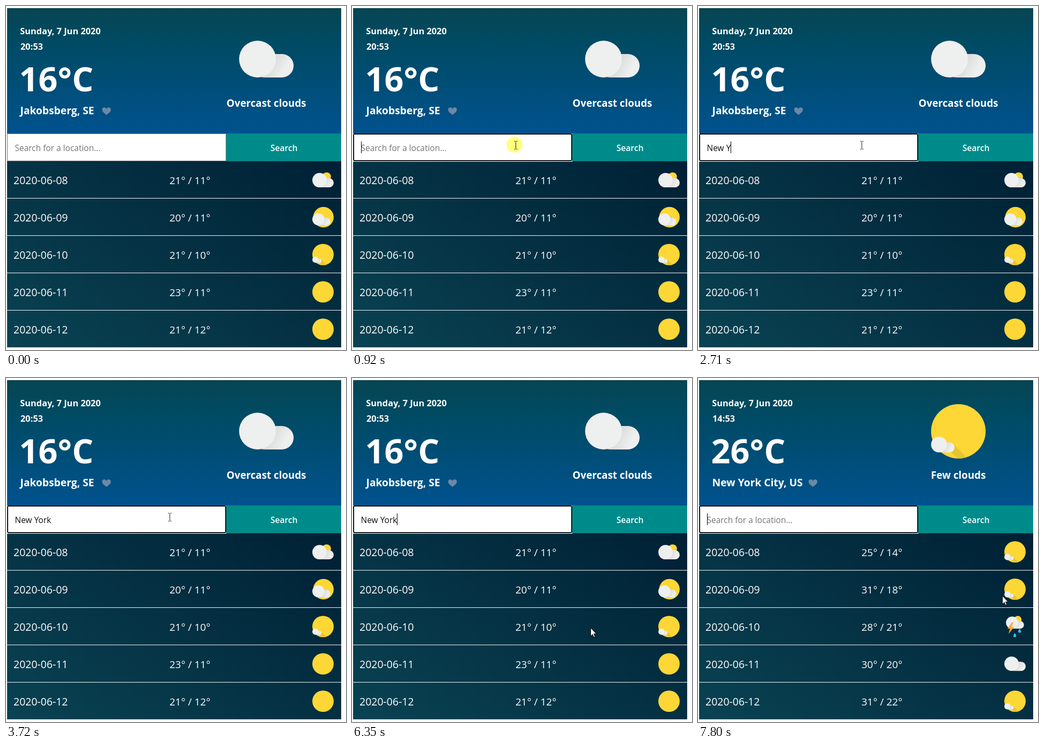
Recreate the animation shown at these times as an HTML page. Size 636x645 px, loop 8000 ms.

```html
<!DOCTYPE html>
<html lang="en">
<head>
<meta charset="utf-8">
<title>Weather search</title>
<style>
  html, body { margin: 0; width: 100%; height: 100%; overflow: hidden; background: #fff; }
  svg { display: block; }
  text { font-family: "Open Sans", "Noto Sans", sans-serif; fill: #fff; white-space: pre; }
  .bold { font-weight: 700; }
  .small { font-size: 16.4px; }
  .place { font-size: 19.3px; }
  .sky { font-size: 18.8px; text-anchor: middle; }
  .temp { font-size: 63px; }
  .day { font-size: 19.5px; font-weight: 500; }
  .range { font-size: 19px; font-weight: 500; text-anchor: middle; }
  .button { font-size: 15.6px; font-weight: 600; text-anchor: middle; }
  .field { font-size: 15.5px; }
</style>
</head>
<body>
<svg width="636" height="645" viewBox="0 0 636 645">
  <defs>
    <linearGradient id="headerFill" x2="0" y2="1">
      <stop stop-color="#084552"/>
      <stop offset=".25" stop-color="#004a62"/>
      <stop offset="1" stop-color="#00528e"/>
    </linearGradient>
    <linearGradient id="listFill" gradientUnits="userSpaceOnUse" x1="144" y1="715" x2="485" y2="216">
      <stop stop-color="#094252"/>
      <stop offset="1" stop-color="#002135"/>
    </linearGradient>
    <linearGradient id="lobeFill" gradientUnits="userSpaceOnUse" x1="60" y1="56" x2="86" y2="70">
      <stop stop-color="#d9dada"/>
      <stop offset="1" stop-color="#eeefef"/>
    </linearGradient>
    <clipPath id="disc"><circle cx="51" cy="51" r="51"/></clipPath>

    <g id="cloud">
      <rect x="25" y="41" width="77" height="44" rx="22" fill="url(#lobeFill)"/>
      <circle cx="34.500" cy="50.500" r="34.500" fill="#eeefef"/>
    </g>
    <symbol id="clear" viewBox="0 0 102 102">
      <circle cx="51" cy="51" r="51" fill="#fdd735"/>
    </symbol>
    <symbol id="few" viewBox="0 0 102 102">
      <use href="#clear" width="102" height="102"/>
      <path d="M41 74L70 103H50L36 89Z" fill="#e7c531" clip-path="url(#disc)"/>
      <use href="#cloud" transform="translate(0 54) scale(.43)"/>
    </symbol>
    <symbol id="scattered" viewBox="0 0 102 102">
      <circle cx="53" cy="51" r="49" fill="#fdd735"/>
      <use href="#cloud" transform="translate(0 19) scale(.84)"/>
    </symbol>
    <symbol id="broken" viewBox="0 0 102 102">
      <circle cx="68" cy="36" r="21" fill="#fdd735"/>
      <use href="#cloud" y="2"/>
    </symbol>
    <symbol id="overcast" viewBox="0 0 102 102">
      <use href="#cloud"/>
    </symbol>
    <symbol id="storm" viewBox="0 0 102 102">
      <circle cx="64" cy="18" r="18" fill="#fdd735"/>
      <use href="#cloud" transform="translate(8 -10) scale(.84)"/>
      <path d="M36 31L15 61H27L20 87L47 52H34L44 31Z" fill="#fbab35"/>
      <g fill="#29c3ea">
        <path id="drop" d="M73 61C77 67 80 71 80 74A7 7 0 0 1 66 74C66 71 69 67 73 61Z"/>
        <use href="#drop" x="-23" y="21"/>
      </g>
    </symbol>
    <path id="heart" d="M8 13C4 10 0 7.500 0 4A4 4 0 0 1 8 2.500A4 4 0 0 1 16 4C16 7.500 12 10 8 13Z" fill="#6c88a6"/>
  </defs>

  <rect x="2" y="4" width="625" height="235" fill="url(#headerFill)"/>
  <rect x="2" y="291" width="625" height="349" fill="url(#listFill)"/>
  <text class="bold small" x="26.300" y="53">Sunday, 7 Jun 2020</text>
  <g id="days"></g>
  <g id="before"></g>
  <g id="after"></g>

  <rect x="411" y="239" width="216" height="52" fill="#008b8b"/>
  <text class="button" x="520" y="272">Search</text>
  <rect id="box" x="2.500" y="239.500" width="409" height="51" fill="#fff" stroke="#767676"/>
  <g id="focus">
    <rect x="2" y="239" width="410" height="53" fill="#fff"/>
    <rect x="3" y="240" width="408" height="50" rx="2" fill="#fff" stroke="#101010" stroke-width="2"/>
  </g>
  <circle id="click" cx="304" cy="260" r="15" fill="#ffff80"/>
  <text class="field" id="hint" x="16.500" y="272" style="fill:#757575">Search for a location...</text>
  <text class="field" id="typed" x="16.500" y="272" style="fill:#111"></text>
  <rect id="caret" y="254" width="1" height="22" fill="#000"/>

  <path id="beam" d="M-3 -7.500H-1L0 -6.500L1 -7.500H3M0 -6.500V6.500M-3 7.500H-1L0 6.500L1 7.500H3" fill="none" stroke="#222"/>
  <path id="arrow" d="M.5 .5V16L4 12.700L6.300 17.800L8.600 16.800L6.400 11.700H11Z" fill="#fff" stroke="#000" stroke-width=".9"/>
</svg>
<script>
const LOOP = 8000, FOCUS = 920, RESULT = 6810, SUBMIT = 6765;
const BLINK = 515, FRAME = 76;
const QUERY = "New York";
const KEY_TIMES = [1530, 1760, 1930, 2240, 2710, 2940, 3090, 3170];

const $ = id => document.getElementById(id);
const show = (id, on) => $(id).setAttribute("visibility", on ? "visible" : "hidden");
const text = (kind, x, y, content) => `<text class="${kind}" x="${x}" y="${y}">${content}</text>`;
const icon = (name, x, y, size) => `<use href="#${name}" x="${x}" y="${y}" width="${size}" height="${size}"/>`;
const rowY = i => 306 + 70 * i;

function drawReport(id, report) {
  const { time, temp, place, heartX, sky, days } = report;
  $(id).innerHTML =
    text("bold small", 27, 82, time) +
    text("bold temp", 24.5, 160, temp) +
    text("bold place", 26.5, 203, place) +
    `<use href="#heart" x="${heartX}" y="191"/>` +
    icon(sky.split(" ")[0].toLowerCase(), 436, 49, 102) +
    text("bold sky", 487, 189, sky) +
    days.map((day, i) => {
      const [high, low, name] = day.split(" ");
      return text("range", 344, rowY(i) + 28, `${high}° / ${low}°`) + icon(name, 573, rowY(i), 40);
    }).join("");
}

drawReport("before", {
  time: "20:53", temp: "16°C", place: "Jakobsberg, SE", heartX: 180, sky: "Overcast clouds",
  days: ["21 11 broken", "20 11 scattered", "21 10 few", "23 11 clear", "21 12 clear"]
});
drawReport("after", {
  time: "14:53", temp: "26°C", place: "New York City, US", heartX: 207, sky: "Few clouds",
  days: ["25 14 few", "31 18 few", "28 21 storm", "30 20 overcast", "31 22 few"]
});

for (let i = 0; i < 5; i++) {
  const date = "2020-06-" + String(8 + i).padStart(2, "0");
  const line = i ? `<path d="M2 ${rowY(i) - 15.5}H627" stroke="#f2f5f6"/>` : "";
  $("days").innerHTML += line + text("day", 14, rowY(i) + 28, date);
}

const moves = [
  { start: 230, end: 610, from: [469, 585], to: [306, 261] },
  { start: 5570, end: 5880, from: [306, 261], to: [382, 369] },
  { start: 6200, end: 6350, from: [382, 369], to: [446, 468] },
  { start: 7350, end: 7800, from: [446, 468], to: [569, 408] }
];
const smooth = p => p * p * (3 - 2 * p);

// The pointer eases along each move, refreshed once per FRAME.
function pointerAt(t) {
  const move = moves.findLast(m => m.start <= t);
  if (!move) return null;
  const steps = Math.round((move.end - move.start) / FRAME);
  const step = Math.min(steps, Math.floor((t - move.start) / (move.end - move.start) * steps));
  const p = smooth((step + 1) / (steps + 1));
  return move.from.map((a, i) => Math.round(a + (move.to[i] - a) * p));
}

// The caret blinks from the latest input event.
function caretVisible(t) {
  const last = [FOCUS, ...KEY_TIMES, SUBMIT].findLast(time => time <= t);
  return last !== undefined && Math.floor((t - last) / BLINK) % 2 === 0;
}

function render(t) {
  const count = t < RESULT ? KEY_TIMES.filter(time => time <= t).length : 0;
  const spot = pointerAt(t);
  const overInput = spot && spot[1] < 291;

  show("before", t < RESULT);
  show("after", t >= RESULT);
  show("focus", t >= FOCUS);
  show("click", t >= FOCUS && t < FOCUS + 150);
  show("hint", count === 0);
  show("caret", caretVisible(t));
  show("beam", overInput);
  show("arrow", spot && !overInput);

  $("box").setAttribute("stroke", overInput ? "#4f4f4f" : "#767676");
  $("typed").textContent = QUERY.slice(0, count);
  $("caret").setAttribute("x", Math.max(17, Math.floor(16.5 + $("typed").getComputedTextLength())));
  if (spot) {
    const [x, y] = spot;
    $("beam").setAttribute("transform", `translate(${x + .5} ${y})`);
    $("arrow").setAttribute("transform", `translate(${x} ${y})`);
  }
}

const start = performance.now();
function tick() {
  render((performance.now() - start) % LOOP);
  requestAnimationFrame(tick);
}
tick();
</script>
</body>
</html>
```
